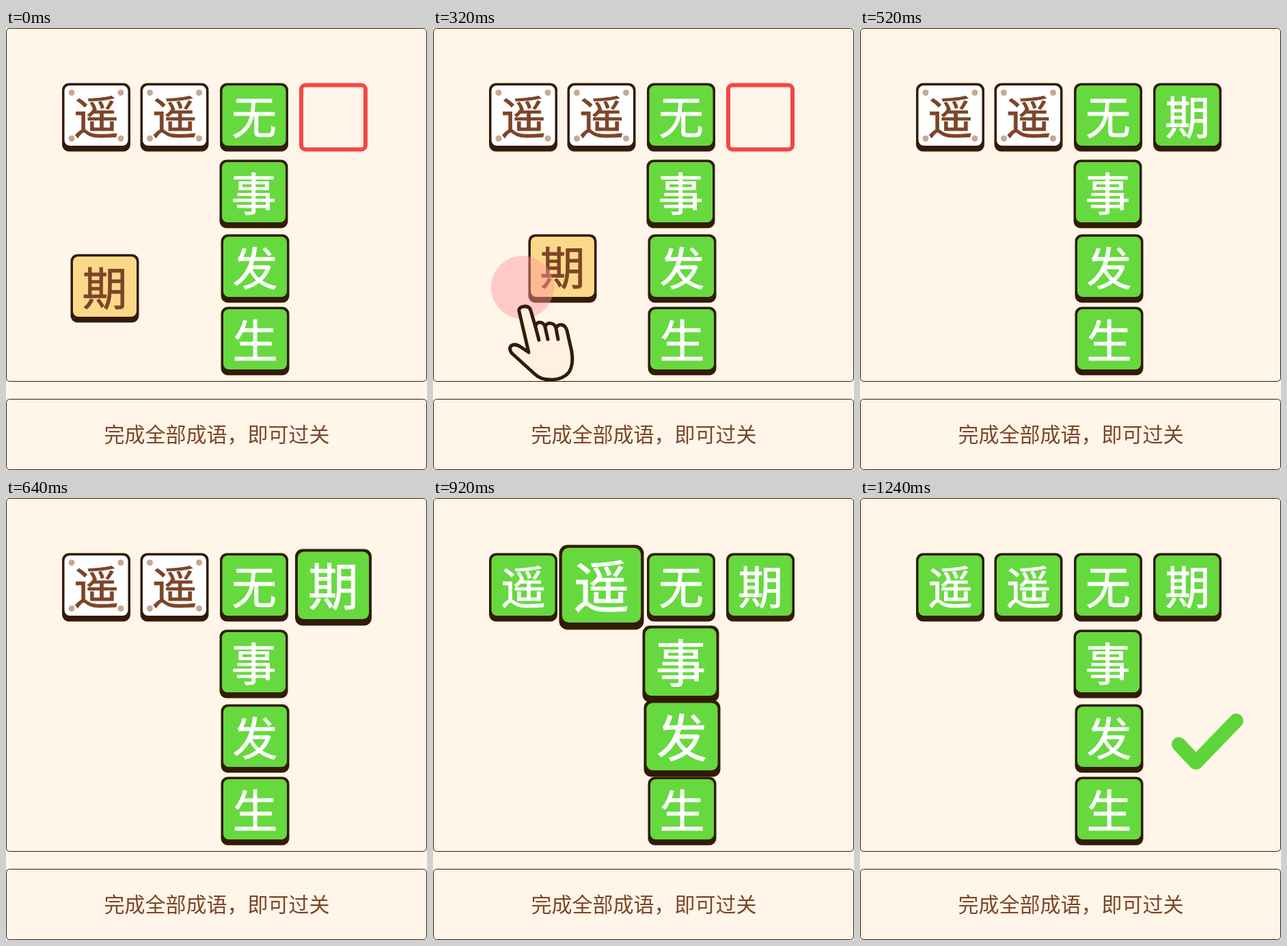
An HTML page with a canvas that plays this animation: 616x646 px, repeating every 1280 ms.

```html
<!DOCTYPE html>
<html lang="zh">
<head>
<meta charset="utf-8">
<style>
  html, body { margin: 0; width: 100%; height: 100%; overflow: hidden; background: #fff5e8; }
  canvas { display: block; }
</style>
</head>
<body>
<canvas id="stage" width="616" height="646"></canvas>
<script>
const ctx = document.getElementById('stage').getContext('2d');
const LOOP = 1280, STEP = 40;
const CREAM = '#fff5e8', DARK = '#331b05', GREEN = '#66d93f', BROWN = '#7d4527';
const FONT = '"Noto Sans CJK SC", "Noto Sans CJK", sans-serif';

// Centre of each tile, time of its largest size, time it turns green
const TILES = [
  { char: '遥', x: 132, y: 130.5, peak: 840, green: 840 },
  { char: '遥', x: 246.5, y: 130.5, peak: 920, green: 880 },
  { char: '无', x: 363, y: 130.5, peak: 720, green: 0 },
  { char: '事', x: 362.5, y: 242.5, peak: 880, green: 0 },
  { char: '发', x: 364.5, y: 351.5, peak: 960, green: 0 },
  { char: '生', x: 364.5, y: 457.5, peak: 1120, green: 0 }
];
const PIECE = { char: '期', x: 479, y: 130.5, peak: 600, green: 520 };
const HOME = { x: 144.5, y: 380.5 };

const HAND = new Path2D(`M126 414 Q125 408 133 407 Q141 406 143 413 L150 437
  C150 428 162 428 164 437 C166 429 178 430 180 439 C183 431 193 432 196 442
  L203 473 Q206 492 199 503 Q191 513 175 514 Q158 515 148 505 L115 475
  Q110 468 115 464 Q121 461 128 466 L140 474 Z
  M150 437 L155 456 M164 437 L168 455 M180 439 L183 455`);
const CHECK = new Path2D('M-42 4.5 L-17 31 L42 -30');

const clamp = v => Math.max(0, Math.min(1, v));
const progress = (t, from, to) => clamp((t - from) / (to - from));

function box(x, y, w, h, r, fill, stroke, width) {
  ctx.beginPath();
  ctx.roundRect(x, y, w, h, r);
  if (fill) { ctx.fillStyle = fill; ctx.fill(); }
  if (stroke) { ctx.strokeStyle = stroke; ctx.lineWidth = width; ctx.stroke(); }
}

function disc(x, y, r, color) {
  ctx.beginPath();
  ctx.arc(x, y, r, 0, Math.PI * 2);
  ctx.fillStyle = color;
  ctx.fill();
}

function text(str, x, y, size, color, weight) {
  ctx.font = `${size}px ${FONT}`;
  ctx.textAlign = 'center';
  ctx.textBaseline = 'alphabetic';
  ctx.fillStyle = ctx.strokeStyle = color;
  ctx.lineWidth = weight;
  ctx.fillText(str, x, y + size * 0.38);
  if (weight) ctx.strokeText(str, x, y + size * 0.38);
}

function drawTile({ char, x, y, scale, face, ink, studs }) {
  ctx.save();
  ctx.translate(x, y);
  ctx.scale(scale, scale);
  box(-50, -50, 100, 100, 10, DARK);
  box(-46.5, -46.5, 93, 88, 8, face);
  if (studs) {
    for (const dx of [-36, 36]) for (const dy of [-36, 31]) disc(dx, dy, 4.5, '#c9a892');
  }
  text(char, 0, -1, 66, ink, 0.8);
  ctx.restore();
}

function tileAt(tile, t, idleFace) {
  const on = t >= tile.green;
  const bump = on ? clamp(1 - Math.abs(t - tile.peak) / 80) : 0;
  drawTile({
    ...tile,
    scale: 1 + 0.24 * bump,
    face: on ? GREEN : idleFace,
    ink: on ? '#fff' : BROWN,
    studs: !on && idleFace === '#fff'
  });
}

function drawPiece(t) {
  if (t >= PIECE.green) return tileAt(PIECE, t);
  box(432, 83.5, 94, 94, 6, null, '#f64545', 6);
  const u = progress(t, 280, 520);
  const x = HOME.x + (PIECE.x - HOME.x) * u ** 1.12;
  const y = HOME.y + (PIECE.y - HOME.y) * u ** 1.2;
  tileAt({ ...PIECE, x, y }, t, '#fcd98a');
}

function drawHand(t) {
  const alpha = progress(t, 0, 160) * (1 - progress(t, 360, 480));
  if (!alpha) return;
  ctx.save();
  ctx.globalAlpha = alpha;
  disc(131, 379, 46 * progress(t, 80, 320), 'rgba(255,150,155,.45)');
  ctx.translate(0, 4 * (1 - progress(t, 80, 320)));
  ctx.fillStyle = '#fff0e0';
  ctx.strokeStyle = DARK;
  ctx.lineWidth = 5;
  ctx.lineCap = ctx.lineJoin = 'round';
  ctx.fill(HAND);
  ctx.stroke(HAND);
  ctx.restore();
}

function drawCheck(t) {
  if (t < 1080) return;
  const scale = 1 + 0.457 * (1 + Math.cos(Math.PI * progress(t, 1080, 1240))) / 2;
  ctx.save();
  ctx.translate(508.5, 355.5);
  ctx.scale(scale, scale);
  ctx.strokeStyle = '#5ed53a';
  ctx.lineWidth = 21;
  ctx.lineCap = ctx.lineJoin = 'round';
  ctx.stroke(CHECK);
  ctx.restore();
}

function draw(t) {
  ctx.fillStyle = CREAM;
  ctx.fillRect(0, 0, 616, 646);
  box(0.5, 0.5, 615, 516, 5, null, DARK, 1);
  box(0.5, 542.5, 615, 103, 5, null, DARK, 1);
  text('完成全部成语，即可过关', 308.5, 594, 30, BROWN, 0);
  for (const tile of TILES) tileAt(tile, t, '#fff');
  drawPiece(t);
  drawHand(t);
  drawCheck(t);
}

function frame() {
  const t = performance.now() % LOOP;
  draw(Math.floor(t / STEP) * STEP);
  requestAnimationFrame(frame);
}
frame();
</script>
</body>
</html>
```
